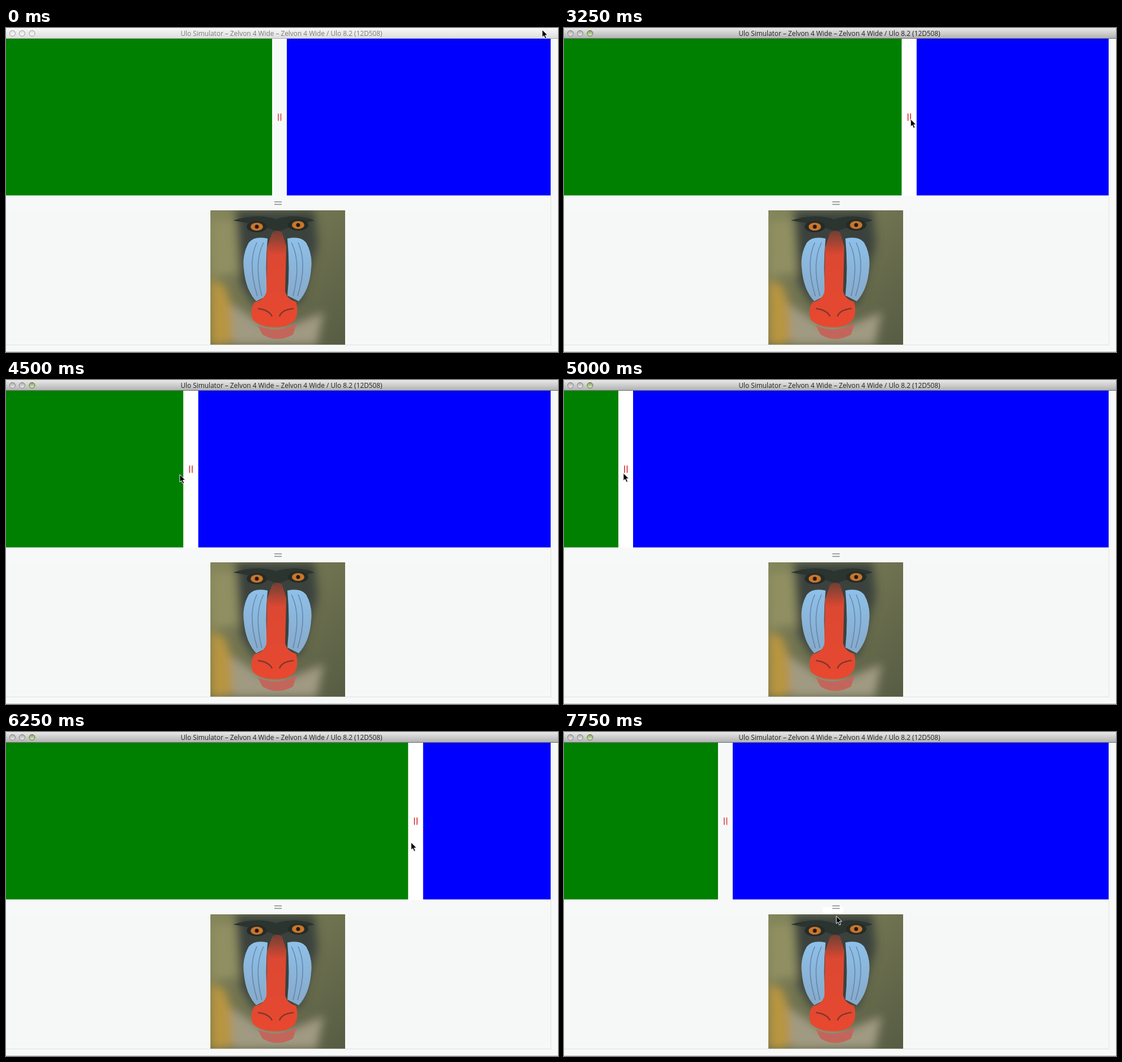
These frames come from a looping animation (975 by 574 pixels, 8000 ms). An HTML page:

```html
<!DOCTYPE html>
<html lang="en">
<head>
<meta charset="utf-8">
<title>Split view</title>
<style>
html, body { margin: 0; width: 100%; height: 100%; overflow: hidden; background: #f7f9f8; }
svg { display: block; }
text { font: 11.85px "Open Sans", "Noto Sans", sans-serif; text-anchor: middle; fill: #7c7c7c; }
.lamp { fill: url(#idleLamp); stroke: #9a9a9a; }
.active text { fill: #222; }
.active .lamp { fill: url(#lamp); stroke: #808080; }
.active .green { fill: url(#greenLamp); stroke: #56703f; }
.active #titleBar { fill: url(#activeBar); }
.active #titleLine { fill: #686868; }
</style>
</head>
<body>
<svg id="stage" width="975" height="574">
  <defs>
    <linearGradient id="idleBar" x2="0" y2="1"><stop stop-color="#f8f8f8"/><stop offset="1" stop-color="#dedede"/></linearGradient>
    <linearGradient id="activeBar" x2="0" y2="1"><stop stop-color="#e9e9e9"/><stop offset="1" stop-color="#b3b3b3"/></linearGradient>
    <linearGradient id="idleLamp" x2="0" y2="1"><stop stop-color="#e2e2e2"/><stop offset="1" stop-color="#f8f8f8"/></linearGradient>
    <linearGradient id="lamp" x2="0" y2="1"><stop stop-color="#aaa"/><stop offset="1" stop-color="#eee"/></linearGradient>
    <linearGradient id="greenLamp" x2="0" y2="1"><stop stop-color="#82a35e"/><stop offset="1" stop-color="#e0f0c4"/></linearGradient>
    <linearGradient id="fur" x2="1" y2="1"><stop stop-color="#85865a"/><stop offset="1" stop-color="#565c44"/></linearGradient>
    <linearGradient id="skin" x2="0" y2="1"><stop stop-color="#8fc0e8"/><stop offset="1" stop-color="#86a9ca"/></linearGradient>
    <linearGradient id="nose" x2="0" y2="1"><stop stop-color="#6f4034"/><stop offset=".25" stop-color="#dc4832"/><stop offset="1" stop-color="#e8482f"/></linearGradient>
    <filter id="soft" x="-30%" y="-30%" width="160%" height="160%"><feGaussianBlur stdDeviation="8"/></filter>
    <clipPath id="crop"><path d="M0 0H238V238H0z"/></clipPath>
    <g id="cheek">
      <path fill="url(#skin)" d="M101 50Q78 45 68 57 56 78 59 103 62 141 81 161L101 151Q96 103 101 50z"/>
      <path fill="none" stroke="#50769a" stroke-width="1.5" opacity=".7" d="M94 57Q76 92 91 152M82 57Q65 94 83 152"/>
    </g>
    <g id="eye">
      <ellipse fill="#252b26" rx="18" ry="10"/>
      <ellipse fill="#c9762c" rx="11" ry="7"/>
      <circle fill="#231c18" r="3.5"/>
    </g>
  </defs>

  <path fill="#f7f9f8" d="M0 0H975V574H0z"/>
  <path fill="#f6f8f7" d="M0 323H962V561H0z"/>
  <path fill="none" stroke="#e0e3e2" d="M962.5 297V561.5H0"/>
  <path fill="#c4c6c5" d="M0 573H975v1H0z"/>
  <path id="smear" fill="#fff"/>
  <path stroke="#858786" stroke-width="1.5" d="M474 308h13m-13 4.5h13"/>

  <rect id="left" y="19" height="277.6" fill="#008000"/>
  <rect id="right" y="19" height="277.6" fill="#00f"/>
  <g id="divider">
    <rect id="strip" y="19" width="26" height="278" fill="#fff"/>
    <path id="grip" stroke-width="1.6" d="M11 151.5v13m4.5-13v13"/>
  </g>

  <g transform="translate(361 323)" clip-path="url(#crop)">
    <path fill="url(#fur)" d="M0 0H238V238H0z"/>
    <g filter="url(#soft)">
      <path fill="#8f8f62" d="M0 20L45 15 50 110 0 118z"/>
      <path fill="#3a433c" d="M44 0H184L190 60 160 165H76L54 130z"/>
      <path fill="#b8953f" d="M0 122L24 132 55 215 30 238H0z"/>
      <path fill="#a09a82" d="M36 165L96 205 140 205 200 180 188 238H40z"/>
    </g>
    <path fill="#2c342f" d="M40 18Q84 4 116 16 150 4 184 18 150 26 119 38 90 26 40 18z"/>
    <use href="#eye" x="82" y="29"/>
    <use href="#eye" x="155" y="26"/>
    <use href="#cheek"/>
    <use href="#cheek" transform="translate(237) scale(-1 1)"/>
    <path fill="#c2665c" d="M84 204Q117 220 152 200L146 220Q118 236 92 220z"/>
    <path fill="url(#nose)" d="M109 40Q118 32 127 40L134 64 132 144Q136 158 151 162 157 178 149 195 134 209 115 207 91 208 75 194 69 177 78 163 96 158 99 144L100 66z"/>
    <path fill="none" stroke="#80382f" stroke-width="2.5" d="M84 174Q103 176 109 188M147 174Q126 176 122 188"/>
  </g>

  <path id="titleBar" fill="url(#idleBar)" d="M0 0H975V18H0z"/>
  <path id="titleLine" fill="#a8a8a8" d="M0 18H975v1H0z"/>
  <circle class="lamp" cx="11.5" cy="9.5" r="5"/>
  <circle class="lamp" cx="28.5" cy="9.5" r="5"/>
  <circle class="lamp green" cx="46" cy="9.5" r="5"/>
  <text x="486.5" y="14">Ulo Simulator – Zelvon 4 Wide – Zelvon 4 Wide / Ulo 8.2 (12D508)</text>

  <path id="cursor" stroke="#fff" d="M0 0V13.5L3.1 10.7 5.4 16 7.8 15 5.5 9.8H9.8z"/>
</svg>
<script>
const STEP = 250, STEPS = 32, PRESS = 11, RELEASE = 29, REPAINT = 30;

// [step, value] turning points of the drag
const splitKeys = [[11, 470], [16, 836.5], [19, 139], [20, 96], [21, 96], [24, 831], [27, 349], [28, 272]];
const heightKeys = [[11, 157], [16, 170], [20, 165], [23, 188], [27, 203]];
// [step, x, y] resting points of the free pointer
const hops = [
  [0, 947, 3], [1, 630, 264], [5, 624, 297], [6, 481, 285], [7, 530, 319],
  [8, 482, 200], [9, 480, 157], [30, 457, 310], [31, 481, 326]
];

const el = id => document.getElementById(id);
const set = (id, name, value) => el(id).setAttribute(name, value);
const isDragging = step => step >= PRESS && step < RELEASE;

function tween(keys, step) {
  const next = keys.findIndex(key => key[0] > step);
  if (next < 0) return keys.at(-1)[1];
  if (next === 0) return keys[0][1];
  const [t0, a] = keys[next - 1], [t1, b] = keys[next];
  return a + (b - a) * (1 - Math.cos(Math.PI * (step - t0) / (t1 - t0))) / 2;
}

const splitAt = step => tween(splitKeys, step);

// While dragging, the divider trails the pointer a little
function pointerAt(step) {
  if (!isDragging(step)) return hops.findLast(hop => hop[0] <= step).slice(1);
  const split = splitAt(step);
  return [split + 11 + (split - splitAt(step - 1)) * 0.05, tween(heightKeys, step)];
}

// Each pointer move leaves a white box around its old and new place
function smearAt(step) {
  if (isDragging(step)) return '';
  let path = '';
  for (let s = step < PRESS ? 1 : REPAINT + 1; s <= step; s++) {
    const [x0, y0] = pointerAt(s - 1), [x1, y1] = pointerAt(s);
    if (x0 === x1 && y0 === y1) continue;
    const right = Math.max(x0, x1) + 12, bottom = Math.max(y0, y1) + 17;
    path += `M${Math.min(x0, x1)} ${Math.min(y0, y1)}H${right}V${bottom}H${Math.min(x0, x1)}z`;
  }
  return path;
}

function draw(time) {
  const step = Math.floor(time / STEP) % STEPS;
  const split = splitAt(step), dragging = isDragging(step);
  set('left', 'width', split);
  set('right', 'x', split + 26);
  set('right', 'width', 936 - split);
  set('divider', 'transform', `translate(${split})`);
  set('strip', 'visibility', dragging ? 'visible' : 'hidden');
  set('grip', 'stroke', dragging ? '#d92a2a' : '#d5454a');
  set('cursor', 'transform', `translate(${pointerAt(step)})`);
  set('smear', 'd', smearAt(step));
  el('stage').classList.toggle('active', step >= PRESS);
}

const start = performance.now();
function tick() {
  draw(performance.now() - start);
  requestAnimationFrame(tick);
}
tick();
</script>
</body>
</html>
```
